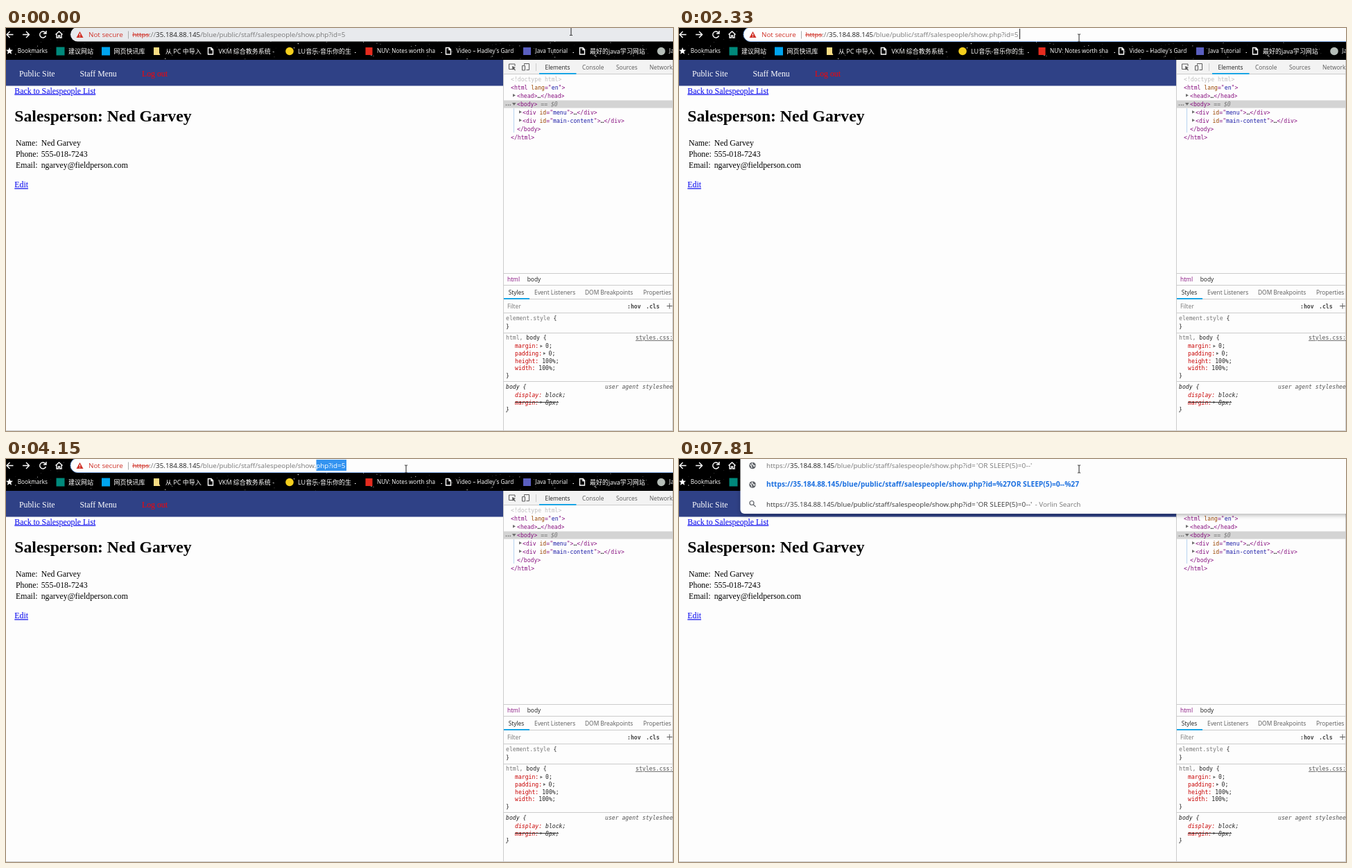
Animation, 962 px wide and 582 px high, one loop 8 s. Source, as an HTML page:

```html
<!DOCTYPE html>
<html lang="en">
<head>
<meta charset="utf-8">
<title>Browser window</title>
<style>
html, body { margin: 0; width: 100%; height: 100%; overflow: hidden; background: #fdfdfd; }
svg { display: block; width: 962px; height: 582px; }
text { white-space: pre; }
.page { font: 11.8px "Liberation Serif", serif; }
.title { font-size: 23.7px; font-weight: 700; }
.link { fill: #00e; text-decoration: underline; }
.url { font: 9.85px "Open Sans", "Noto Sans", sans-serif; }
.match { font-size: 10.2px; font-weight: 700; fill: #1a6fe0; }
.query { letter-spacing: .2px; }
.marks { font: 8.2px "Open Sans", "Noto Sans CJK SC", "Noto Sans CJK", sans-serif; fill: #fff; }
.cjk { font-size: 9px; }
.ui { font: 8.4px "Open Sans", "Noto Sans", sans-serif; fill: #5a5a5a; }
.code { font: 8.15px "DejaVu Sans Mono", monospace; fill: #222; }
.tag { fill: #881280; }
.attr { fill: #994500; }
.val { fill: #1a1aa6; }
.prop { fill: #c80000; }
.dim { fill: #777; }
.line { fill: none; stroke: #ccc; }
.icon { fill: none; stroke: #fff; stroke-width: 1.4; }
</style>
</head>
<body>
<svg viewBox="0 0 962 582">
  <defs>
    <clipPath id="selClip"><rect id="selBox" y="1" height="16"/></clipPath>
    <path id="doc" class="icon" d="M.5 .5h4.500l2.500 2.500v7h-7zM5 .5v3h2.500"/>
    <g id="globe"><circle r="4.800" fill="#5f6368"/><path d="M-3.500-1.500l2 2 .5 3M0-4l-1 2 2 1 1 2 2-1" fill="none" stroke="#fff" stroke-width="1.100"/></g>
    <text id="path" class="url" x="280.200" y="13">/blue/public/staff/salespeople/show.php?id=5</text>
    <filter id="shadow" x="-5%" y="-20%" width="110%" height="160%"><feDropShadow dx="0" dy="2" stdDeviation="3" flood-opacity=".3"/></filter>
  </defs>

  <!-- page -->
  <rect width="962" height="582" fill="#fdfdfd"/>
  <rect y="46" width="717" height="37.500" fill="#2f4186"/>
  <g class="page">
    <g fill="#fff"><text x="19" y="69.500">Public Site</text><text x="106.500" y="69.500">Staff Menu</text></g>
    <text x="196" y="69.500" fill="#f00">Log out</text>
    <text class="link" x="12.300" y="94.500">Back to Salespeople List</text>
    <text class="title" x="12.300" y="135">Salesperson: Ned Garvey</text>
    <text x="14" y="169.500">Name:</text><text x="50.700" y="169.500">Ned Garvey</text>
    <text x="14" y="185.500">Phone:</text><text x="50.700" y="185.500">555-018-7243</text>
    <text x="14" y="201.500">Email:</text><text x="50.700" y="201.500">ngarvey@fieldperson.com</text>
    <text class="link" x="12.300" y="230.300">Edit</text>
  </g>

  <!-- developer tools -->
  <rect x="718" y="46" width="244" height="20.500" fill="#f3f3f3"/>
  <rect x="718" y="104.500" width="244" height="11" fill="#d4d4d4"/>
  <path class="line" d="M717.500 46V582M718 66.500h244M718 354.500h244M718 371.500h244M718 391.500h244M718 411.500h244M718 440.500h244M718 510.500h244M764.500 51v11M0 581.500h962M961.500 46V582"/>
  <path stroke="#b8d3ef" d="M732.500 116v35"/>
  <path fill="#03a0e8" d="M769 65h53.500v1.800H769zM718 390h37v1.800H718z"/>
  <g fill="none" stroke="#5a5a5a">
    <path d="M733 59.500h-7.500v-7.500h8.500v3"/><path d="M730 55l5 2-2 1 2 3-1 .5-2-2.500-1.500 1.500z" fill="#5a5a5a" stroke="none"/>
    <path d="M747.500 53.500v-2h7v9h-4M744.500 54.500h4v6.500h-4z"/>
  </g>
  <g class="ui">
    <text x="777.500" y="59.500" fill="#222">Elements</text><text x="831" y="59.500">Console</text>
    <text x="880" y="59.500">Sources</text><text x="928" y="59.500">Network</text>
    <text x="723" y="366.300" class="tag">html</text><text x="751.700" y="366.300" fill="#222">body</text>
    <text x="724.700" y="385" fill="#222">Styles</text><text x="762" y="385">Event Listeners</text>
    <text x="835" y="385">DOM Breakpoints</text><text x="919" y="385">Properties</text>
    <text x="723" y="405" class="dim">Filter</text>
  </g>
  <path fill="#6e6e6e" d="M731 95l4 2.300-4 2.300zM740 119l4 2.300-4 2.300zM740 131l4 2.300-4 2.300zM730 108h5.500l-2.750 4zM770.500 457.500l3.500 2-3.500 2zM775 468l3.500 2-3.500 2zM770.500 538.500l3.500 2-3.500 2z"/>
  <g class="code">
    <text x="728" y="77" fill="#c0c0c0">&lt;!doctype html&gt;</text>
    <text x="728" y="89" class="tag">&lt;html <tspan class="attr">lang</tspan>="<tspan class="val">en</tspan>"&gt;</text>
    <text x="737" y="101" class="tag">&lt;head&gt;<tspan fill="#222">…</tspan>&lt;/head&gt;</text>
    <text x="719" y="112" class="dim" font-weight="700" letter-spacing="-2">...</text>
    <text x="737" y="113" class="tag">&lt;body&gt;<tspan class="dim" font-style="italic"> == $0</tspan></text>
    <text x="745" y="125" class="tag">&lt;div <tspan class="attr">id</tspan>="<tspan class="val">menu</tspan>"&gt;<tspan fill="#222">…</tspan>&lt;/div&gt;</text>
    <text x="745" y="137" class="tag">&lt;div <tspan class="attr">id</tspan>="<tspan class="val">main-content</tspan>"&gt;<tspan fill="#222">…</tspan>&lt;/div&gt;</text>
    <text x="737" y="148.500" class="tag">&lt;/body&gt;</text>
    <text x="728" y="160.500" class="tag">&lt;/html&gt;</text>
    <g font-weight="700" fill="#444"><text x="896" y="404.500">:hov</text><text x="923" y="404.500">.cls</text></g>
    <path d="M953 401.500h8M957 397.500v8" stroke="#5a5a5a"/>
    <text x="721" y="422" class="dim">element.style <tspan fill="#222">{</tspan></text>
    <text x="721" y="434">}</text>
    <text x="721" y="450"><tspan class="dim">html, </tspan>body {</text>
    <text x="908" y="450" fill="#555" text-decoration="underline">styles.css:1</text>
    <text x="734" y="462" class="prop">margin:</text><text x="778" y="462">0;</text>
    <text x="734" y="473" class="prop">padding:</text><text x="782.500" y="473">0;</text>
    <text x="734" y="483.700"><tspan class="prop">height:</tspan> 100%;</text>
    <text x="734" y="494.300"><tspan class="prop">width:</tspan> 100%;</text>
    <text x="721" y="505">}</text>
    <g font-style="italic">
      <text x="721" y="521">body {</text><text x="864" y="521" fill="#555">user agent stylesheet</text>
      <text x="734" y="533"><tspan class="prop">display:</tspan> block;</text>
      <text x="734" y="543.500" class="prop">margin:</text><text x="778" y="543.500">8px;</text>
      <text x="721" y="554">}</text>
    </g>
    <path d="M734 540.500h63" stroke="#333"/>
  </g>

  <!-- browser frame -->
  <rect width="962" height="46" fill="#000"/>
  <g id="stars" fill="#fff"></g>
  <path class="icon" d="M10.500 9.500H1.500m4-4.500l-4.500 4.500 4.500 4.500M24 9.500h9m-4-4.500l4.500 4.500-4.500 4.500M57 7a4.500 4.500 0 1 0 .5 4M58 4v4h-4M71.500 9.500L76.500 5l5 4.500M73 9v5h2.500v-3h2v3H80V9"/>
  <g class="marks">
    <path d="M5 28l1.400 3.500 3.600.2-2.800 2.400.9 3.700L5 35.800 1.900 37.800l.9-3.700L0 31.700l3.600-.2z"/>
    <text x="16.700" y="36">Bookmarks</text>
    <rect x="72.500" y="27.500" width="12" height="12" fill="#00897b"/>
    <text class="cjk" x="90" y="36.500">建议网站</text>
    <rect x="138" y="27.500" width="12" height="12" fill="#00a4ef"/>
    <text class="cjk" x="155.500" y="36.500">网页快讯库</text>
    <path d="M213 28h8v8l1.500 3H213z" fill="#f8dc82"/>
    <text class="cjk" x="230" y="36.500">从 PC 中导入</text>
    <use href="#doc" x="291" y="28"/>
    <text class="cjk" x="306.500" y="36.500">VKM 综合教务系统 -</text>
    <circle cx="409" cy="33.500" r="5.800" fill="#f5cf1d"/>
    <text class="cjk" x="421" y="36.500">LU音乐-音乐你的生</text>
    <rect x="518.500" y="28" width="10" height="11" fill="#e62b1e"/>
    <text x="535" y="36">NUV: Notes worth sha</text>
    <use href="#doc" x="634" y="28"/>
    <text x="649.500" y="36">Video – Hadley's Gard</text>
    <rect x="746" y="28" width="11" height="11" fill="#5a5fc0"/>
    <text x="763.500" y="36">Java Tutorial</text>
    <use href="#doc" x="827" y="28"/>
    <text class="cjk" x="842" y="36.500">最好的java学习网站</text>
    <circle cx="945" cy="33.500" r="5.800" fill="#b5bdb8"/>
    <text x="956.500" y="36">Ja</text>
    <path d="M503 35.500h1.500M627.500 35.500h1.500M817.500 35.500h1.500" stroke="#fff"/>
  </g>

  <!-- address bar -->
  <g id="bar">
    <rect id="pill" x="93" y="-1" width="890" height="20.500" rx="10.250"/>
    <path d="M106.500 5l5 9h-10z" fill="#d0342a"/><path d="M106.500 8v3M106.500 12v1" stroke="#fff"/>
    <g class="url">
      <text x="119" y="13" fill="#d0342a">Not secure</text>
      <text x="182.500" y="13" fill="#d0342a">https<tspan class="dim">://</tspan></text>
      <text x="216" y="13" fill="#222">35.184.88.145</text>
    </g>
    <path d="M176.500 4.500v11" stroke="#aaa"/><path d="M182 10h25" stroke="#d0342a"/>
    <use href="#path" fill="#777"/>
    <g clip-path="url(#selClip)"><rect x="440" width="60" height="20" fill="#3393f0"/><use href="#path" fill="#fff"/></g>
  </g>

  <!-- suggestions -->
  <g id="drop">
    <rect x="88.500" y="-10" width="890" height="89" rx="6" fill="#fdfdfd" filter="url(#shadow)"/>
    <use href="#globe" x="106" y="9.500"/><use href="#globe" x="106" y="37"/>
    <g fill="none" stroke="#5f6368" stroke-width="1.200"><circle cx="105" cy="63.500" r="3"/><path d="M107.200 65.700l3.300 3.300"/></g>
    <g class="url">
      <text x="126" y="13" class="dim">https://<tspan x="160" fill="#222">35.184.88.145</tspan><tspan x="224.200">/blue/public/staff/salespeople/show.php?id=</tspan><tspan class="query" x="429">'OR SLEEP(5)=0--'</tspan></text>
      <text x="126" y="40.300" class="match">https://35.184.88.145/blue/public/staff/salespeople/show.php?id=%27OR SLEEP(5)=0--%27</text>
      <text x="126" y="68.500" fill="#333">https://<tspan x="160">35.184.88.145</tspan><tspan x="224.200">/blue/public/staff/salespeople/show.php?id=</tspan><tspan class="query" x="429">'OR SLEEP(5)=0--'</tspan><tspan x="513.500" class="dim">- Vorlin Search</tspan></text>
    </g>
  </g>
  <rect id="caret" y="1" width="1" height="15" fill="#222"/>
  <path id="beam" fill="none" stroke="#222" d="M-2-5.500h1.500l.5.500.5-.5H2M0-5V5M-2 5.500h1.500L0 5l.5.500H2"/>
  <path id="arrow" fill="#111" stroke="#fff" stroke-width=".4" d="M0 0v13l3-3 2.500 5.500 2-1-2.500-5h4z"/>
</svg>
<script>
const $ = id => document.getElementById(id);
const show = (id, on) => $(id).style.display = on ? '' : 'none';

// Latest entry whose start time has passed
const at = (steps, t) => steps.filter(s => s[0] <= t).pop();

const pointer = [
  [0, 'beam', 815, 5], [260, 'beam', 813, 2], [390, 'arrow', 805, -11.5], [510],
  [1320, 'arrow', 916, -11.5], [1470, 'beam', 731, 10], [1610, 'beam', 680, 12],
  [1740, 'beam', 630, 13], [1890, 'beam', 595, 14], [2020, 'beam', 577, 14.5]
];
const selection = [[0, 491], [3720, 485], [3870, 469.5], [4150, 447.5], [4420, 453.5], [4690, 459.5], [4840, 465]];
const carets = [[0], [2330, 491], [2480], [3160, 491], [3720], [6240, 510], [6680], [7230, 510], [7810]];
const bars = [[0, '#e8eaed'], [390, '#edeff1'], [510, '#f1f3f4'], [1470, '#e8eaed'], [2330, '#fdfdfd']];

let seed = 7;
const random = () => (seed = seed * 16807 % 2147483647) / 2147483647;
for (let i = 0; i < 230; i++) {
  const star = document.createElementNS('http://www.w3.org/2000/svg', 'circle');
  star.setAttribute('cx', random() * 962);
  star.setAttribute('cy', random() * 46);
  star.setAttribute('r', .25 + random() ** 3 * .6);
  star.setAttribute('opacity', .3 + random() * .6);
  $('stars').append(star);
}

function draw(t) {
  const [, kind, x, y] = at(pointer, t);
  for (const id of ['beam', 'arrow']) show(id, id === kind);
  if (kind) $(kind).setAttribute('transform', `translate(${x} ${y})`);

  const from = at(selection, t)[1];
  $('selBox').setAttribute('x', from);
  $('selBox').setAttribute('width', 491 - from);

  const caret = at(carets, t)[1];
  show('caret', caret);
  if (caret) $('caret').setAttribute('x', caret);

  $('pill').setAttribute('fill', at(bars, t)[1]);
  $('pill').setAttribute('stroke', t >= 2330 ? '#8ab4f0' : 'none');
  show('bar', t < 6240);
  show('drop', t >= 6240);
}

const start = performance.now();
function tick() {
  draw((performance.now() - start) % 8000);
  requestAnimationFrame(tick);
}
tick();
</script>
</body>
</html>
```
